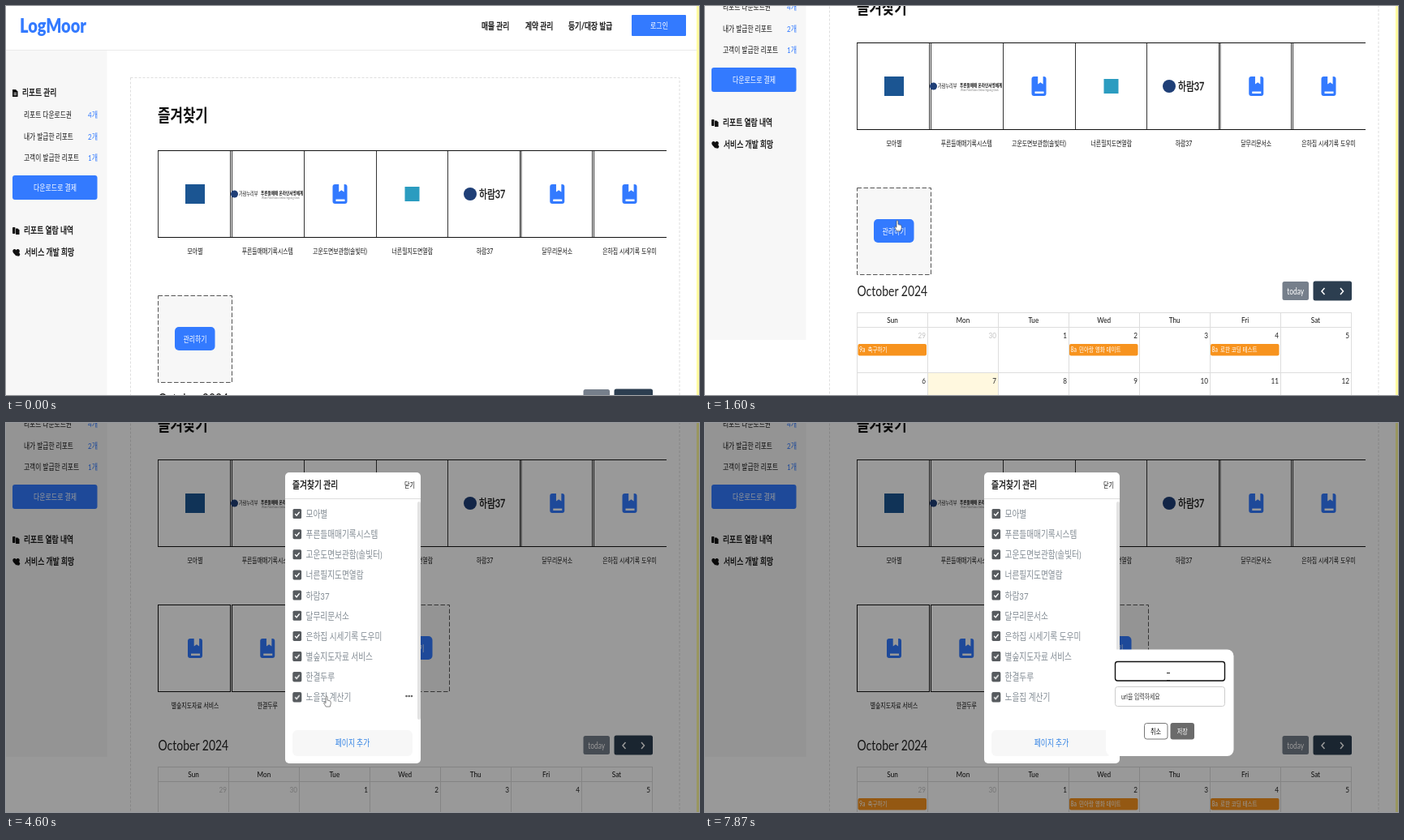
Recreate the animation shown at these times as an HTML page. Size 854 px wide and 480 px high, loop 8000 ms.

```html
<!DOCTYPE html>
<html lang="ko">
<head>
<meta charset="utf-8">
<title>즐겨찾기 관리</title>
<style>
html, body { margin: 0; width: 100%; height: 100%; overflow: hidden; background: #fff; }
svg { display: block; width: 854px; height: 480px; font-family: Lato, "Noto Sans CJK KR", sans-serif; fill: #111; }
.m { text-anchor: middle; }
.e { text-anchor: end; }
.b { font-weight: 700; }
.h { font-weight: 900; }
.d { stroke: #111; stroke-width: .35px; }
.w { fill: #fff; }
.blue { fill: #337aff; }
.line { fill: none; stroke: #111; }
.grid { fill: none; stroke: #ddd; }
.step { animation: 8s step-end infinite; }

#page { animation: scroll 8s ease-out infinite; }
#cursor { animation: move 8s ease-in-out infinite; }

@keyframes scroll {
  0%, 7.7% { transform: none; }
  9.8%, 10.3% { transform: translateY(-67px); }
  12.6%, 100% { transform: translateY(-133px); }
}
@keyframes move {
  0%, 1.4% { transform: translate(184px, 166px); }
  5%, 10.6% { transform: translate(458px, 130.5px); }
  18.4% { transform: translate(243px, 256px); }
  20%, 28.5% { transform: translate(237px, 264.5px); }
  31.6%, 33% { transform: translate(412px, 252px); }
  35.9%, 41.5% { transform: translate(412px, 287px); }
  43.5%, 47.5% { transform: translate(397px, 312px); }
  49.1% { transform: translate(396px, 323px); }
  51%, 57.4% { transform: translate(395px, 337px); }
  64.1% { transform: translate(417px, 383px); }
  65.9%, 73% { transform: translate(418px, 386px); }
  74.2%, 83% { transform: translate(420px, 389px); }
  91.6%, 100% { transform: translate(571px, 309px); }
}
@keyframes add7 { 0% { opacity: 0; } 38% { opacity: 1; } }
@keyframes add8 { 0% { opacity: 0; } 44.6% { opacity: 1; } }
@keyframes add9 { 0% { opacity: 0; } 53.7% { opacity: 1; } }
@keyframes slot {
  0% { transform: none; }
  38% { transform: translateX(89px); }
  44.6% { transform: translateX(179px); }
  53.7%, 100% { transform: translateX(268px); }
}
@keyframes drop { 0% { transform: none; } 38%, 100% { transform: translateY(46px); } }
@keyframes events {
  0%, 29.7%, 42.3%, 48%, 59% { opacity: 1; }
  25.5%, 38%, 44.6%, 53.7% { opacity: 0; }
}
@keyframes modal { 0% { opacity: 0; } 25.5% { opacity: 1; } }
@keyframes popup { 0% { opacity: 0; } 76.3% { opacity: 1; } }
@keyframes hover {
  0% { opacity: 0; }
  30.5% { opacity: 1; transform: translateY(262px); }
  34% { opacity: 1; transform: translateY(287px); }
  42.5% { opacity: 1; transform: translateY(312px); }
  49.6% { opacity: 1; transform: translateY(337px); }
  58.3%, 100% { opacity: 0; }
}
@keyframes focus { 0% { opacity: 0; } 91.2% { opacity: 1; } }
@keyframes caret { 0% { opacity: 0; } 91.2% { opacity: 1; } 98%, 100% { opacity: 0; } }
@keyframes arrow {
  0% { opacity: 0; } 1.4% { opacity: 1; }
  18.8% { opacity: 0; } 25.5% { opacity: 1; }
  30.5% { opacity: 0; } 59.3% { opacity: 1; }
  62.5% { opacity: 0; } 84.5% { opacity: 1; }
  90.4%, 100% { opacity: 0; }
}
@keyframes hand {
  0% { opacity: 0; } 18.8% { opacity: 1; }
  25.5% { opacity: 0; } 30.5% { opacity: 1; }
  59.3% { opacity: 0; } 62.5% { opacity: 1; }
  84.5%, 100% { opacity: 0; }
}
@keyframes beam { 0% { opacity: 0; } 90.4% { opacity: 1; } }
</style>
</head>
<body>
<svg id="stage" viewBox="0 0 854 480"></svg>
<script>
const names = ['모아별', '푸른들매매기록시스템', '고운도면보관함(솔빛터)', '너른필지도면열람', '하람37',
  '달무리문서소', '은하집 시세기록 도우미', '별숲지도자료 서비스', '한결두루', '노을집 계산기'];
const days = ['Sun', 'Mon', 'Tue', 'Wed', 'Thu', 'Fri', 'Sat'];

const each = (n, fn) => Array.from({ length: n }, (_, i) => fn(i)).join('');
// The whole page is shown squeezed to 80% of its width; y is the middle of the line.
const text = (x, y, s, size, cls = '', attr = '') =>
  `<text transform="translate(${x} ${y + size * .37}) scale(.8 1)" font-size="${size}" class="${cls}" ${attr}>${s}</text>`;
const rect = (x, y, w, h, r = 0, attr = '') =>
  `<rect x="${x}" y="${y}" width="${w}" height="${h}" rx="${r}" ${attr}/>`;
const path = (d, attr = '') => `<path d="${d}" ${attr}/>`;
const circle = (x, y, r, color) => `<circle cx="${x}" cy="${y}" r="${r}" fill="${color}"/>`;
const group = (s, attr) => `<g ${attr}>${s}</g>`;
const step = (name, s) => group(s, `class="step" style="animation-name:${name}"`);
const at = (x, y, s) => group(s, `transform="translate(${x} ${y})"`);
const fill = c => `fill="${c}"`;
const BLUE = 'class="blue"';
const NAVY = '#1f3f77';
const center = i => 233 + 89.25 * i;

const header = text(17, 24, 'LogMoor', 25, 'h blue')
  + text(586, 24.5, '매물 관리', 10.9, 'd') + text(640, 24.5, '계약 관리', 10.9, 'd')
  + text(693, 24.5, '등기/대장 발급', 10.9, 'd')
  + rect(771, 11, 67, 26, 1, BLUE) + text(805, 24.5, '로그인', 9.9, 'm w')
  + rect(0, 54, 851, 1, 0, fill('#eaeaea'));

const tickets = [['리포트 다운로드권', 4], ['내가 발급한 리포트', 2], ['고객이 발급한 리포트', 1]];
const sidebar = rect(0, 55, 124.5, 490, 0, fill('#f7f7f7'))
  + path('M8 103h4l2.5 2.5V112H8z') + path('M9.5 107.5h3.5M9.5 109.5h3.5', 'stroke="#fff" stroke-width=".8"')
  + text(20, 107, '리포트 관리', 10.9, 'd')
  + tickets.map(([s, n], i) => text(22, 134.5 + 26.5 * i, s, 9.7)
    + text(113, 134.5 + 26.5 * i, n + '개', 10, 'e blue')).join('')
  + rect(8, 209, 104.5, 30, 3, BLUE) + text(60.5, 224, '다운로드로 결제', 9.9, 'm w')
  + rect(8, 273, 3.4, 8, .8) + path('M12 274.5h2.5l2 2V282H12z')
  + text(22, 277, '리포트 열람 내역', 11, 'd')
  + path('M12.5 308.5l-3.6-4q-1.6-3 .6-4.200 2-.8 3 1 1.200-1.800 3.200-1 2 1.400 .4 4.200z') + circle(15, 306.5, 2.2, '#111')
  + text(23, 303.5, '서비스 개발 희망', 11, 'd');

const book = rect(-9, -12, 18, 24, 3, BLUE)
  + path('M-1.3-12H5.1V-2.400L1.900-4.700-1.300-2.400ZM-5 6.500H6V9H-5Z', fill('#fff'));

const contract = circle(281.5, 232, 4.5, NAVY)
  + text(287, 231.5, '가람누리부', 6.4) + text(314, 230.5, '푸른들매매 온라인서명체계', 5.8, 'b')
  + text(315, 236.5, 'Wide Field Sales Online Signing Desk', 3.6, '', fill('#777'));

const logos = [
  rect(221, 220, 24, 24, 0, fill('#1b5592')),
  contract,
  at(center(2), 232, book),
  rect(491.5, 223, 18, 18, 0, fill('#2b9cc0')),
  circle(572, 232, 8, NAVY) + text(583, 232, names[4], 13.5, 'd'),
  at(center(5), 232, book),
  at(center(6), 232, book)
];
const edges = [187.5, 276.5, 278.5, 367.5, 456.5, 544.5, 633.5, 635, 722.5, 724.5];
const favorites = path('M187 178.5H814M187 285.5H814', 'class="line"')
  + path(edges.map(x => `M${x} 178V286`).join(''), 'class="line" stroke-width=".85"')
  + logos.join('')
  + each(7, i => text(center(i), 303, names[i], 8.6, 'm'));

const added = each(3, i => {
  const x = [187.5, 278.5, 367.5][i];
  return step('add' + (i + 7), rect(x, 357.5, 89, 107, 0, 'class="line"')
    + at(center(i), 411, book) + text(center(i), 482, names[i + 7], 8.6, 'm'));
});

const manage = step('slot', rect(187.5, 357.5, 91, 107, 0, 'fill="#f7f7f7" stroke="#555" stroke-dasharray="5.5 2.5"')
  + rect(208, 396, 49.5, 29, 5, BLUE) + text(233, 411, '관리하기', 9.9, 'm w'));

const event = (x, time, s) => rect(x, 550, 84.5, 14.5, 2, fill('#f7931e'))
  + text(x + 1.5, 557, time, 8.6, 'w') + text(x + 12, 557, s, 8.2, 'w');
const date = i => {
  const n = i < 2 ? 29 + i : i - 1;
  return text(272 + 87 * (i % 7), 539 + 56 * (i / 7 | 0), n, 10.2, 'e', fill(i < 2 ? '#c4c4c4' : '#222'));
};
const calendar = step('drop', text(187.5, 485, 'October 2024', 17.5, '', fill('#222'))
  + rect(711.5, 473, 32.5, 23, 2.5, fill('#767f8b')) + text(727.7, 485, 'today', 10.5, 'm w')
  + rect(749.5, 472.5, 47.5, 24, 2.5, fill('#2c3e50'))
  + path('M763.5 481l-3.5 4 3.5 4M783 481l3.5 4-3.5 4', 'fill="none" stroke="#fff" stroke-width="1.5"')
  + rect(275, 586, 87, 56, 0, fill('#fff8df'))
  + path('M187 511.5H797M187 529.5H797M187 585.5H797' + each(8, i => `M${187.5 + 87 * i} 511V650`), 'class="grid"')
  + each(7, i => text(231 + 86.9 * i, 520.5, days[i], 10.2, 'm'))
  + each(14, date)
  + step('events', event(188.5, '9a', '축구하기') + event(449, '8a', '민아랑 영화 데이트') + event(623, '8a', '로한 코딩 테스트')));

const page = group(header + sidebar
  + rect(153.5, 88.5, 676.5, 700, 0, 'fill="none" stroke="#dedede" stroke-dasharray="3 2"')
  + text(187, 134.3, '즐겨찾기', 21, 'b') + favorites + added + manage + calendar, 'id="page"');

const tick = color => path('M-2.6 0L-.7 2.2 2.8-2.2', `fill="none" stroke="${color}" stroke-width="1.4"`);
const boxOn = rect(-5.3, -6, 10.6, 12, 1.6, fill('#565a5e')) + tick('#fff');
const boxOff = rect(-4.7, -5.4, 9.4, 10.8, 1.2, 'fill="#fff" stroke="#565a5e" stroke-width="1.2"') + tick('#565a5e');
const item = i => {
  const y = 112 + 25.15 * i;
  return at(358.8, y, i < 7 ? boxOn : boxOff + step('add' + i, boxOn))
    + text(369.5, y + .5, names[i], 12.1, '', fill('#838c94'));
};
const modal = step('modal', rect(0, 0, 854, 480, 0, 'fill="#000" fill-opacity=".4"')
  + rect(344, 61, 167, 359, 5, fill('#fff'))
  + text(353, 76.5, '즐겨찾기 관리', 12.2, 'd') + text(504, 76.5, '닫기', 8.8, 'e')
  + rect(344, 93, 167, 1, 0, fill('#ddd')) + rect(507, 97, 4, 269, 2, fill('#e3e3e3'))
  + each(10, item)
  + step('hover', each(3, i => circle(493.5 + 3.2 * i, 0, 1.3, '#666')))
  + rect(353, 379, 148, 32, 6, fill('#f7f7f7')) + text(427, 395, '페이지 추가', 10.9, 'm', fill('#2f80e4')));

const input = (y, s) => rect(505.5, y, 135, 24, 3, 'fill="#fff" stroke="#ccc"') + text(513, y + 12.2, s, 8.6, '', fill('#333'));
const popup = step('popup', rect(494, 279.5, 157.5, 131.5, 8, fill('#fff'))
  + input(294.5, '제목을 입력하세요') + input(325.5, 'url을 입력하세요')
  + step('focus', rect(505.5, 294.5, 135, 23.5, 3, 'fill="#fff" stroke="#111" stroke-width="1.4"'))
  + step('caret', rect(513, 301, 1, 10))
  + rect(541.5, 370.5, 28.5, 19.5, 3, 'fill="#fff" stroke="#777"') + text(555.5, 380.5, '취소', 8.8, 'm')
  + rect(573.5, 370, 29.5, 20.5, 3, fill('#6b6b6b')) + text(588.3, 380.5, '저장', 8.8, 'm w'));

const outline = 'fill="#fff" stroke="#333" stroke-width=".6" stroke-linejoin="round"';
const cursor = group(
  step('arrow', path('M0 0V9.5L2 7.8 3.4 11 4.7 10.4 3.3 7.3H6Z', outline))
  + step('hand', path('M-1 1Q-1 0 0 0T1 1V5L4 5.7Q5.2 6.1 5.2 7.3V9.5L4.2 13H-.8L-3.3 8.7Q-3.4 7.2-2 7.8L-1 8.7Z', outline))
  + step('beam', path('M-2-.5H2M-2 8.5H2', 'stroke="#222"')), 'id="cursor"');

document.getElementById('stage').innerHTML = page
  + rect(851, 0, 3, 480, 0, fill('#fffba0')) + modal + popup + cursor;
</script>
</body>
</html>
```
